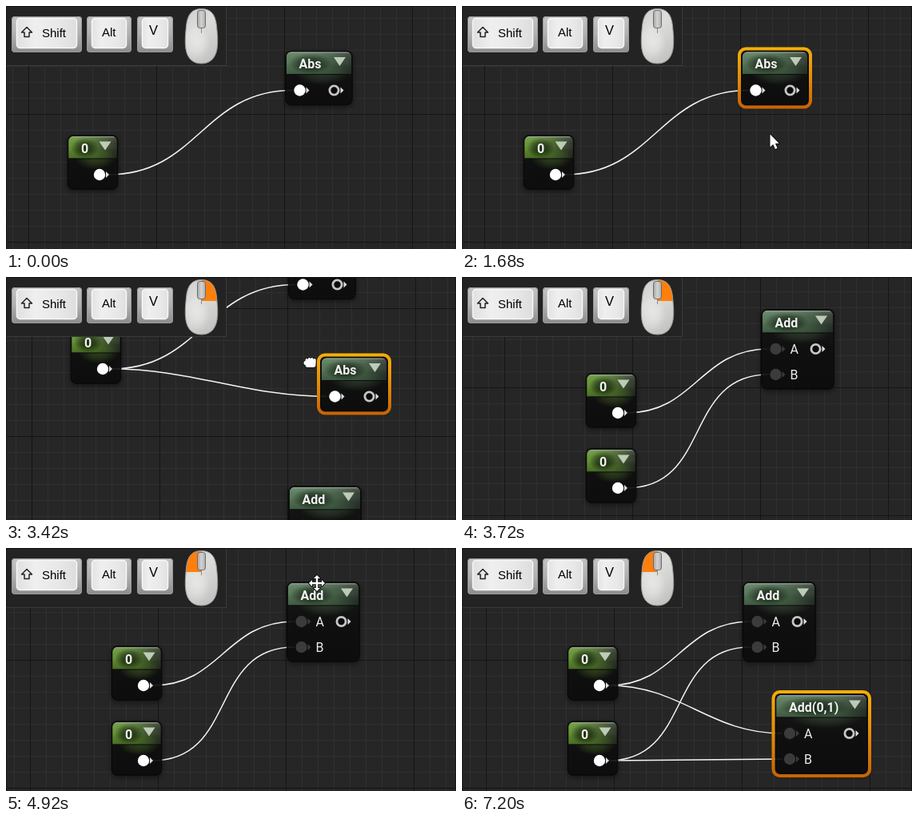
An HTML page with a canvas for the animation above (7260 ms loop, 563 by 304 pixels).

```html
<!DOCTYPE html>
<html lang="en">
<head>
<meta charset="utf-8">
<title>Duplicating graph nodes</title>
<style>
html, body { margin: 0; width: 100%; height: 100%; overflow: hidden; background: #262626; }
canvas { display: block; width: 563px; height: 304px; }
</style>
</head>
<body>
<canvas id="stage"></canvas>
<script>
const W = 563, H = 304, LOOP = 7260, STEP = 60;
const UI = '"Liberation Sans", Arial, sans-serif';
const NODE = 'Roboto, "Open Sans", sans-serif';
const ORANGE = '#ff7f0c';
const PIN_Y = 49.5, PIN_GAP = 32;
const canvas = document.getElementById('stage');
const dpr = window.devicePixelRatio || 1;
canvas.width = W * dpr;
canvas.height = H * dpr;
const c = canvas.getContext('2d');

// [time, x, y]
const CAMERA = [
  [3120, 0, 0], [3240, 1, -16], [3420, 4, -96], [3540, 12, -190], [3660, 23, -300],
  [3720, 25, -317], [3840, 25, -324], [4020, 25, -324], [4380, 2, -315]
];
const POINTER = [
  [180, 538, 127], [480, 470, 96], [780, 424, 84], [900, 424, 84], [960, 449, 108],
  [1200, 449, 108], [1440, 415, 130], [1680, 385, 160], [1980, 381, 201], [2040, 381, 202],
  [3120, 381, 202], [4680, 393, 2], [4860, 389, 44], [5100, 389, 44], [5160, 389, 48],
  [5400, 385, 149], [5820, 385, 180], [6000, 385, 183], [6180, 385, 183],
  [6720, 479, 78], [6960, 545, 35]
];

const within = (t, a, b) => t >= a && t < b;

function track(keys, t) {
  if (t <= keys[0][0]) return keys[0].slice(1);
  for (let i = 1; i < keys.length; i++) {
    const [t1, x1, y1] = keys[i];
    if (t > t1) continue;
    const [t0, x0, y0] = keys[i - 1], k = (t - t0) / (t1 - t0);
    return [x0 + (x1 - x0) * k, y0 + (y1 - y0) * k].map(Math.round);
  }
  return keys[keys.length - 1].slice(1);
}

function gradient(x0, y0, x1, y1, ...colors) {
  const g = c.createLinearGradient(x0, y0, x1, y1);
  colors.forEach((col, i) => g.addColorStop(i / (colors.length - 1), col));
  return g;
}

// Soft elliptical spot that fades to nothing at its rim
function spot(x, y, rx, ry, rgb, alpha) {
  c.save();
  c.translate(x, y);
  c.scale(rx, ry);
  const g = c.createRadialGradient(0, 0, 0, 0, 0, 1);
  g.addColorStop(0, `rgba(${rgb},${alpha})`);
  g.addColorStop(.5, `rgba(${rgb},${alpha * .65})`);
  g.addColorStop(1, `rgba(${rgb},0)`);
  c.fillStyle = g;
  c.fillRect(-1, -1, 2, 2);
  c.restore();
}

function round(x, y, w, h, r) {
  c.beginPath();
  c.roundRect(x, y, w, h, r);
}

function poly(points, fill, stroke, width = 1) {
  c.beginPath();
  points.forEach(([x, y]) => c.lineTo(x, y));
  c.closePath();
  if (stroke) { c.strokeStyle = stroke; c.lineWidth = width; c.stroke(); }
  if (fill) { c.fillStyle = fill; c.fill(); }
}

function text(str, x, y, font, color) {
  c.font = font;
  c.fillStyle = color;
  c.fillText(str, x, y);
}

function grid([cx, cy]) {
  c.fillStyle = '#262626';
  c.fillRect(0, 0, W, H);
  const lines = (major, color) => {
    c.fillStyle = color;
    const mod = v => ((v % 160) + 160) % 160;
    for (let i = -8; i < 32; i++) {
      if ((i % 8 === 0) !== major) continue;
      c.fillRect(mod(28 + cx) + i * 20, 0, 1, H);
      c.fillRect(0, mod(135 + cy) + i * 20, W, 1);
    }
  };
  lines(false, '#303030');
  lines(true, '#151515');
}

function wire(x0, y0, x1, y1) {
  const d = (Math.abs(x1 - x0) + Math.abs(y1 - y0)) / 3;
  c.beginPath();
  c.moveTo(x0, y0);
  c.bezierCurveTo(x0 + d, y0, x1 - d, y1, x1, y1);
  c.strokeStyle = '#f4f4f4';
  c.lineWidth = 1.5;
  c.stroke();
}

function pin(x, y, kind) {
  const color = { full: '#fff', ring: '#c6c6c6', idle: '#3b3b3b' }[kind];
  c.beginPath();
  c.arc(x, y, kind === 'ring' ? 5.6 : 7.2, 0, 7);
  if (kind === 'ring') {
    c.fillStyle = '#0a0a0a';
    c.fill();
    c.strokeStyle = color;
    c.lineWidth = 2.8;
    c.stroke();
  } else {
    c.fillStyle = color;
    c.fill();
  }
  poly([[x + 8, y - 4], [x + 12, y], [x + 8, y + 4]], kind === 'idle' ? color : '#dedede');
}

function header(x, y, w, title, green) {
  c.fillStyle = green
    ? gradient(x, 0, x + w, 0, '#689636', '#57822c', '#40592a', '#2b3028')
    : gradient(x, 0, x + w, 0, '#587a5a', '#4f6f53', '#405a42', '#2e362f');
  c.fillRect(x + 1, y + 1, w - 2, 28);
  c.font = `bold 16px ${NODE}`;
  const half = c.measureText(title).width / 2;
  spot(x + w * .55, y + 29, w * .4, 14, green ? '120,175,60' : '100,140,100', .3);
  spot(x + 17 + half, y + 16, half + 13, 13, '8,18,5', .8);
  c.fillStyle = gradient(0, y, 0, y + 29, 'rgba(255,255,255,.18)', 'rgba(255,255,255,.04)', 'rgba(0,0,0,.1)', 'rgba(0,0,0,.25)');
  c.fillRect(x + 1, y + 1, w - 2, 28);
  c.fillStyle = 'rgba(160,168,158,.6)';
  c.fillRect(x + 3, y + 1.5, w - 6, 1.5);
  c.fillStyle = '#0b0e0a';
  c.fillRect(x + 1, y + 29, w - 2, 1);
}

function node({ x, y, w, h, title, ins = [], out, green, selected }) {
  c.save();
  c.shadowColor = 'rgba(0,0,0,.65)';
  c.shadowBlur = 7 * dpr;
  c.shadowOffsetY = 2 * dpr;
  round(x, y, w, h, 7);
  c.fillStyle = gradient(0, y, 0, y + h, 'rgba(26,27,26,.84)', 'rgba(14,15,14,.84)', 'rgba(11,12,11,.84)');
  c.fill();
  c.restore();

  c.save();
  round(x + 1, y + 1, w - 2, h - 2, 6);
  c.clip();
  header(x, y, w, title, green);
  c.restore();

  round(x + .5, y + .5, w - 1, h - 1, 7);
  c.strokeStyle = '#090a09';
  c.lineWidth = 1.5;
  c.stroke();
  if (selected) {
    round(x - 2.5, y - 2.5, w + 5, h + 5, 8);
    c.strokeStyle = gradient(0, y - 4, 0, y + h + 4, '#f5ae08', '#e28c08', '#c96205');
    c.lineWidth = 4;
    c.stroke();
  }

  text(title, x + 17, y + 22, `bold 16px ${NODE}`, '#f2f2f2');
  const tx = x + w - 16;
  poly([[tx - 7.5, y + 8], [tx + 7.5, y + 8], [tx, y + 19]], 'rgba(212,224,206,.85)');
  ins.forEach((label, i) => {
    const py = y + PIN_Y + i * PIN_GAP;
    pin(x + 18, py, label ? 'idle' : 'full');
    if (label) text(label, x + 36, py + 6, `16px ${NODE}`, '#ececec');
  });
  pin(x + w - 23, y + PIN_Y, out);
}

const constant = (x, y) => ({ x, y, w: 63, h: 68, title: '0', out: 'full', green: true });
const abs = (x, y, selected) => ({ x, y, w: 84, h: 68, title: 'Abs', ins: [''], out: 'ring', selected });
const add = (x, y, w, title, selected) => ({ x, y, w, h: 100, title, ins: ['A', 'B'], out: 'ring', selected });

function graph(t, [cx, cy]) {
  const k1 = constant(77, 161.5), k2 = constant(130, 437.5), k3 = constant(130, 531.5);
  const a1 = abs(349.5, 56, within(t, 960, 2280));
  const s1 = add(349.5, 357.5, 91, 'Add', within(t, 5160, 6120));
  const nodes = [k1, k2, k3, a1, s1];
  const links = [[k1, a1, 0], [k2, s1, 0], [k3, s1, 1]];
  if (t >= 2280) {
    const a2 = abs(389.5, 196, t < 5160);
    nodes.push(a2);
    links.push([k1, a2, 0]);
  }
  if (t >= 6120) {
    const s2 = add(390, 497.5, 115.5, 'Add(0,1)', true);
    nodes.push(s2);
    links.push([k2, s2, 0], [k3, s2, 1]);
  }
  c.save();
  c.translate(cx, cy);
  for (const [a, b, i] of links) wire(a.x + 51, a.y + PIN_Y, b.x + 9, b.y + PIN_Y + i * PIN_GAP);
  nodes.forEach(node);
  c.restore();
}

function key(x, w, label, lx, ly, size, down) {
  const y = 13, h = 45;
  round(x, y, w, h, 4);
  c.fillStyle = down ? '#f68d2a' : gradient(0, y, 0, y + h, '#c4c4c4', '#b0b0b0', '#8c8c8c');
  c.fill();
  if (!down) {
    c.strokeStyle = '#9b9b9b';
    c.lineWidth = 1;
    round(x + .5, y + .5, w - 1, h - 1, 4);
    c.stroke();
  }
  round(x + 6.5, y + 2.5, w - 13, h - 8, 4);
  c.fillStyle = down ? '#fb9838' : gradient(x, 0, x + w, 0, '#dcdcdc', '#efefef', '#e8e8e8', '#dadada');
  c.fill();
  c.strokeStyle = down ? '#f28a2b' : '#f8f8f8';
  c.lineWidth = 1.5;
  c.stroke();
  text(label, lx, ly, `${size}px ${UI}`, down ? '#70400f' : '#000');
}

function mousePath() {
  c.beginPath();
  c.moveTo(244.5, 3.5);
  c.bezierCurveTo(256, 3.5, 262, 10, 263.5, 25);
  c.bezierCurveTo(264.5, 36, 265.5, 44, 264, 54);
  c.bezierCurveTo(261.5, 67, 254, 72, 244.5, 72);
  c.bezierCurveTo(234, 72, 227, 66, 225, 54);
  c.bezierCurveTo(223.5, 44, 224.5, 36, 225.5, 25);
  c.bezierCurveTo(227, 10, 233, 3.5, 244.5, 3.5);
  c.closePath();
}

function mouse(left, right) {
  mousePath();
  c.fillStyle = gradient(224, 10, 266, 60, '#cfcfcd', '#dededc', '#d2d2d0', '#c2c2c0');
  c.fill();
  c.save();
  c.clip();
  spot(240, 46, 15, 22, '255,255,255', .4);
  c.fillStyle = ORANGE;
  if (left) c.fillRect(222, 2, 22.5, 28);
  if (right) c.fillRect(244.5, 2, 24, 28);
  c.restore();
  mousePath();
  c.strokeStyle = '#979795';
  c.lineWidth = 1;
  c.stroke();
  round(239.5, 5.5, 10, 22, 3);
  c.fillStyle = gradient(239, 0, 250, 0, '#a2a2a2', '#d2d2d2', '#a8a8a8');
  c.fill();
  c.strokeStyle = '#6c6c6c';
  c.stroke();
  c.fillStyle = '#8b8b8a';
  c.fillRect(244, 28, 1, 6);
}

function panel(t) {
  c.fillStyle = '#232323';
  c.fillRect(0, 0, 276, 75);
  c.fillStyle = '#3a3a3a';
  c.fillRect(275, 0, 1, 75);
  c.fillRect(0, 74, 276, 1);
  const alt = within(t, 1860, 2460) || within(t, 5640, 6240);
  const v = within(t, 2220, 2460) || within(t, 5820, 6240);
  key(7, 88, 'Shift', 45, 39, 15, false);
  key(101, 56, 'Alt', 120, 38, 15, alt);
  key(164, 45, 'V', 179, 36, 16.5, v);
  poly([[26, 26.5], [32.5, 33], [29, 33], [29, 38.5], [23, 38.5], [23, 33], [19.5, 33]], null, '#222', 1.5);
  mouse(within(t, 720, 1260) || within(t, 4800, 5160) || t >= 7200, within(t, 3180, 4380));
}

function arrow(x, y) {
  poly([[0, 0], [0, 16], [3.7, 12.6], [6.4, 18.4], [9, 17.2], [6.4, 11.6], [11, 11.2]]
    .map(([a, b]) => [x + .5 + a, y + .5 + b]), '#fff', '#111', 2);
}

function cross(x, y) {
  const arm = [[-1.2, -1.2], [-1.2, -6], [-4, -6], [0, -10], [4, -6], [1.2, -6]];
  const points = [0, 1, 2, 3].flatMap(q => arm.map(([a, b]) => {
    for (let i = 0; i < q; i++) [a, b] = [-b, a];
    return [x + a, y + b];
  }));
  poly(points, '#fff', '#111', 2.2);
}

function hand(x, y) {
  const shape = () => {
    c.beginPath();
    for (let i = 0; i < 4; i++) c.roundRect(x - 5.5 + i * 3.3, y - 6 + (i === 0 || i === 3 ? 1 : 0), 3.3, 7, 1.6);
    c.roundRect(x - 7.5, y - 2, 4, 5, 2);
    c.roundRect(x - 5.5, y - 3, 13, 9, 3);
  };
  shape();
  c.strokeStyle = '#111';
  c.lineWidth = 1.6;
  c.stroke();
  shape();
  c.fillStyle = '#fff';
  c.fill();
}

function pointer(t, [cx, cy]) {
  const [x, y] = track(POINTER, t);
  if (within(t, 3180, 4440)) hand(376 + cx, 203 + cy);
  else if (within(t, 4860, 5160)) cross(x, y);
  else if (within(t, 180, 3180) || within(t, 4680, 7020)) arrow(x, y);
}

function draw(now) {
  const t = Math.floor((now % LOOP) / STEP) * STEP;
  const cam = track(CAMERA, t);
  c.setTransform(dpr, 0, 0, dpr, 0, 0);
  c.lineJoin = 'round';
  grid(cam);
  graph(t, cam);
  pointer(t, cam);
  panel(t);
  c.fillStyle = '#141414';
  c.fillRect(0, 0, W, 1);
  c.fillRect(0, 0, 1, H);
  c.fillRect(W - 1, 0, 1, H);
}

const start = performance.now();
function tick() {
  draw(performance.now() - start);
  requestAnimationFrame(tick);
}
tick();
</script>
</body>
</html>
```
